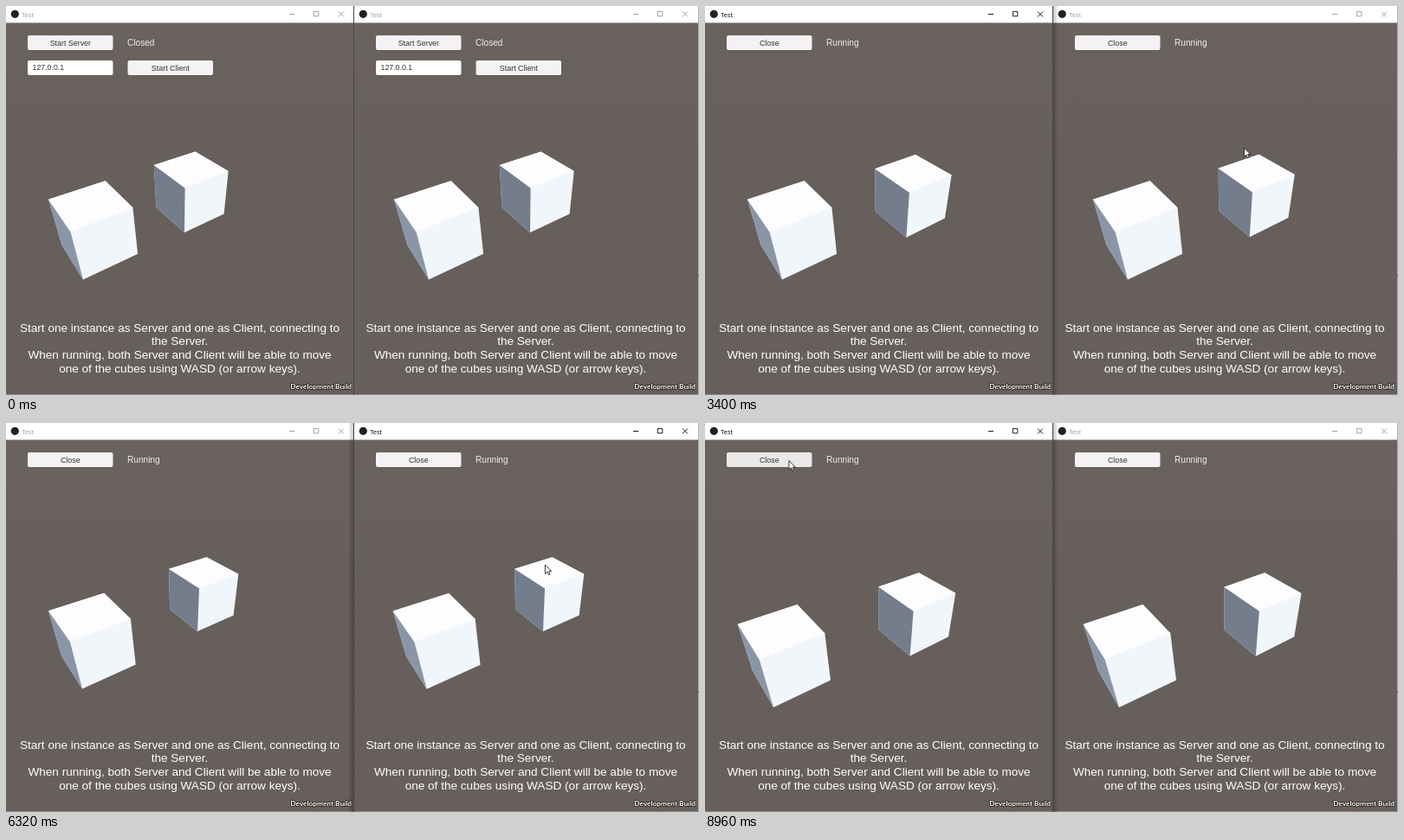
These frames come from a looping animation (800x450 px, 9 s). An HTML page with a canvas:

```html
<!DOCTYPE html>
<html lang="en">
<head>
<meta charset="utf-8">
<title>Cubes</title>
<style>
  html, body { margin: 0; width: 100%; height: 100%; overflow: hidden; }
  canvas { display: block; }
</style>
</head>
<body>
<canvas id="stage" width="800" height="450"></canvas>
<script>
const ctx = document.getElementById('stage').getContext('2d');
const LOOP = 9000, STEP = 40, BAR = 19.45;
const UI_FONT = '"Liberation Sans", Arial, sans-serif';
const TITLE_FONT = '"Open Sans", sans-serif';
const BUILD_FONT = '700 8.3px Lato, sans-serif';
const HELP = [
  'Start one instance as Server and one as Client, connecting to',
  'the Server.',
  'When running, both Server and Client will be able to move',
  'one of the cubes using WASD (or arrow keys).'
];

// The client window on the right shows the cubes a moment late
const WINDOWS = [
  { x: 0, right: 401, mid: 200.5, scene: 0, lag: 0, runs: 1440 },
  { x: 402, right: 798, mid: 600, scene: 399, lag: 40, runs: 2480 }
];

// Moves: start time, end time, goal, sideways bend; cubes go by their lowest corner
const move = (from, to, x, y, bend = 0) => ({ from, to, x, y, bend });
const FRONT = {
  x: 89, y: 316.4,
  moves: [
    move(4680, 5280, 110, 331.2, 0.4), move(5280, 5960, 68, 330, -0.15),
    move(5960, 6320, 88, 307.6, -0.2), move(6360, 6840, 79, 329)
  ]
};
const BACK = {
  x: 206, y: 262,
  moves: [
    move(2960, 3560, 238, 269), move(3560, 4440, 221, 241, 0.15),
    move(7000, 7880, 252, 257), move(7920, 8960, 236.6, 269.6, -0.6)
  ]
};
const MOUSE = {
  x: 510, y: 444,
  moves: [
    move(600, 1240, 92, 44), move(1600, 2120, 620, 72.5), move(2520, 2800, 622.4, 164),
    move(6520, 6840, 246, 142), move(7920, 8960, 97, 43.6, 0.48)
  ]
};

function at({ x, y, moves }, t) {
  for (const m of moves) {
    if (t <= m.from) break;
    const u = Math.min(1, (t - m.from) / (m.to - m.from));
    const s = u * u * (3 - 2 * u), arc = 4 * s * (1 - s) * m.bend;
    const dx = m.x - x, dy = m.y - y;
    x += dx * s - dy * arc;
    y += dy * s + dx * arc;
  }
  return [x, y];
}

// Index of the focused window, -1 for none
function focusAt(t) {
  if (t < 1320) return -1;
  return (t >= 2320 && t < 2640) || (t >= 4440 && t < 6760) ? 1 : 0;
}

function rect(x, y, w, h, fill) {
  ctx.fillStyle = fill;
  ctx.fillRect(x, y, w, h);
}

function poly(points, fill) {
  ctx.beginPath();
  points.forEach(p => ctx.lineTo(p[0], p[1]));
  ctx.closePath();
  ctx.fillStyle = fill;
  ctx.fill();
}

function text(str, x, y, font, fill, align = 'left') {
  ctx.font = font;
  ctx.textAlign = align;
  ctx.fillStyle = fill;
  ctx.fillText(str, x, y);
}

function fade(x0, y0, x1, y1, a, b) {
  const g = ctx.createLinearGradient(x0, y0, x1, y1);
  g.addColorStop(0, a);
  g.addColorStop(1, b);
  return g;
}

// Pinhole camera looking down on the ground plane
const FOCAL = 370, CX = 200.5, CY = 234.5, FLOOR = 3.941;
const PITCH = Math.atan(270 / 370), YAW = Math.atan(640 / Math.hypot(270, 370));
const sp = Math.sin(PITCH), cp = Math.cos(PITCH);
const ground = a => [Math.sin(a), -Math.cos(a) * sp, Math.cos(a) * cp];
const EAST = ground(YAW), NORTH = ground(YAW - Math.PI / 2), UP = [0, -cp, -sp];

function cube([px, py], side) {
  const rx = (px - CX) / FOCAL, ry = (py - CY) / FOCAL, z = FLOOR / (cp * ry + sp);
  const corner = (e, n, u) => {
    const [X, Y, Z] = [rx * z, ry * z, z].map((v, i) => v + e * EAST[i] + n * NORTH[i] + u * UP[i]);
    return [CX + FOCAL * X / Z, CY + FOCAL * Y / Z];
  };
  const top = corner(0, 0, 1), left = corner(0, 1, 1), right = corner(1, 0, 1);
  const low = corner(0, 0, 0), far = corner(0, 1, 0), back = corner(1, 1, 1);
  poly([low, far, left, back, right, corner(1, 0, 0)], '#f1f6fb');
  poly([low, far, left, top], side);
  poly([top, left, back, right], '#fdfcfe');
}

function box(x, y, fill) {
  const layer = (dy, color) => {
    ctx.beginPath();
    ctx.roundRect(x, y + dy, 98.5, 16.9, 2);
    ctx.fillStyle = color;
    ctx.fill();
  };
  layer(0.5, '#58514d');
  layer(0, fill);
}

function button(label, x, y, mouse, pressed) {
  const over = mouse && mouse[0] > x && mouse[0] < x + 98 && mouse[1] > y && mouse[1] < y + 17;
  box(x, y, over ? (pressed ? '#c8c6c7' : '#eae8e9') : '#f4f2f4');
  text(label, x + 49.3, y + 11.5, '8.9px ' + UI_FONT, '#323232', 'center');
}

function titleBar({ x, right }, active) {
  const ink = active ? '#000' : '#999', b = right - 74;
  rect(x, 0, right + 1 - x, BAR, '#fff');
  ctx.beginPath();
  ctx.arc(x + 10.3, 9.3, 4.6, 0, 7);
  ctx.fillStyle = '#222';
  ctx.fill();
  text('Test', x + 18.3, 12.5, '7.4px ' + TITLE_FONT, ink);
  ctx.strokeStyle = ink;
  ctx.lineWidth = 0.9;
  ctx.beginPath();
  ctx.moveTo(b, 9.5);
  ctx.lineTo(b + 6, 9.5);
  ctx.rect(b + 28.4, 6.4, 5.4, 5.4);
  ctx.moveTo(b + 57, 6.5);
  ctx.lineTo(b + 63, 12.5);
  ctx.moveTo(b + 63, 6.5);
  ctx.lineTo(b + 57, 12.5);
  ctx.stroke();
}

function drawWindow(win, t, mouse, active) {
  const { x, right, mid, scene, lag, runs } = win, running = t >= runs;
  const pressed = t >= runs - 120 && !running;
  rect(x, 19, right + 1 - x, 430.5, fade(0, 19, 0, 190, '#6a625e', '#675f5b'));

  ctx.save();
  ctx.translate(scene, 0);
  cube(at(BACK, t - lag), '#747d8c');
  cube(at(FRONT, t - lag), '#8b95a8');
  ctx.restore();

  button(running ? 'Close' : 'Start Server', x + 25, 34, mouse, pressed);
  text(running ? 'Running' : 'Closed', x + 140, 45.8, '10.1px ' + UI_FONT, '#f0eeee');
  if (!running) {
    box(x + 25, 63, '#fff');
    text('127.0.0.1', x + 30.5, 74.3, '8.8px ' + UI_FONT, '#323232');
    button('Start Client', x + 140.5, 63, mouse, pressed);
  }

  HELP.forEach((line, i) => text(line, mid, 376.6 + i * 15.65, '13.58px ' + UI_FONT, '#fff', 'center'));
  ctx.font = BUILD_FONT;
  ctx.textAlign = 'right';
  ctx.strokeStyle = '#1c1a19';
  ctx.lineWidth = 1.4;
  ctx.lineJoin = 'round';
  ctx.strokeText('Development Build', right - 2, 443);
  text('Development Build', right - 2, 443, BUILD_FONT, '#fff', 'right');
  titleBar(win, active);
}

// Soft shadow that the focused window casts across the seam
function seam(focus) {
  const from = focus === 1 ? 402 : 401, to = focus === 1 ? 395 : 408;
  if (focus >= 0) rect(Math.min(from, to), 0, 7, 450, fade(from, 0, to, 0, 'rgba(0,0,0,.28)', 'rgba(0,0,0,0)'));
  rect(401, 0, 1, 450, '#4b4643');
}

function pointer([x, y]) {
  const shape = [[0, 0], [0, 10.4], [2.4, 8.2], [4, 11.7], [5.7, 11], [4.2, 7.6], [7.2, 7.4]];
  ctx.lineWidth = 0.9;
  ctx.strokeStyle = '#222';
  poly(shape.map(p => [x + p[0], y + p[1]]), '#fff');
  ctx.stroke();
}

function draw(now) {
  const t = Math.floor(now % LOOP / STEP) * STEP;
  const mouse = t > 600 ? at(MOUSE, t) : null;
  const focus = focusAt(t);
  rect(0, 0, 800, 450, '#b4b0ae');
  WINDOWS.forEach((win, i) => drawWindow(win, t, mouse, focus === i));
  seam(focus);
  rect(798, 311, 2, 1, '#555');
  if (mouse) pointer(mouse);
}

const start = performance.now();
function frame() {
  draw(performance.now() - start);
  requestAnimationFrame(frame);
}
frame();
</script>
</body>
</html>
```
